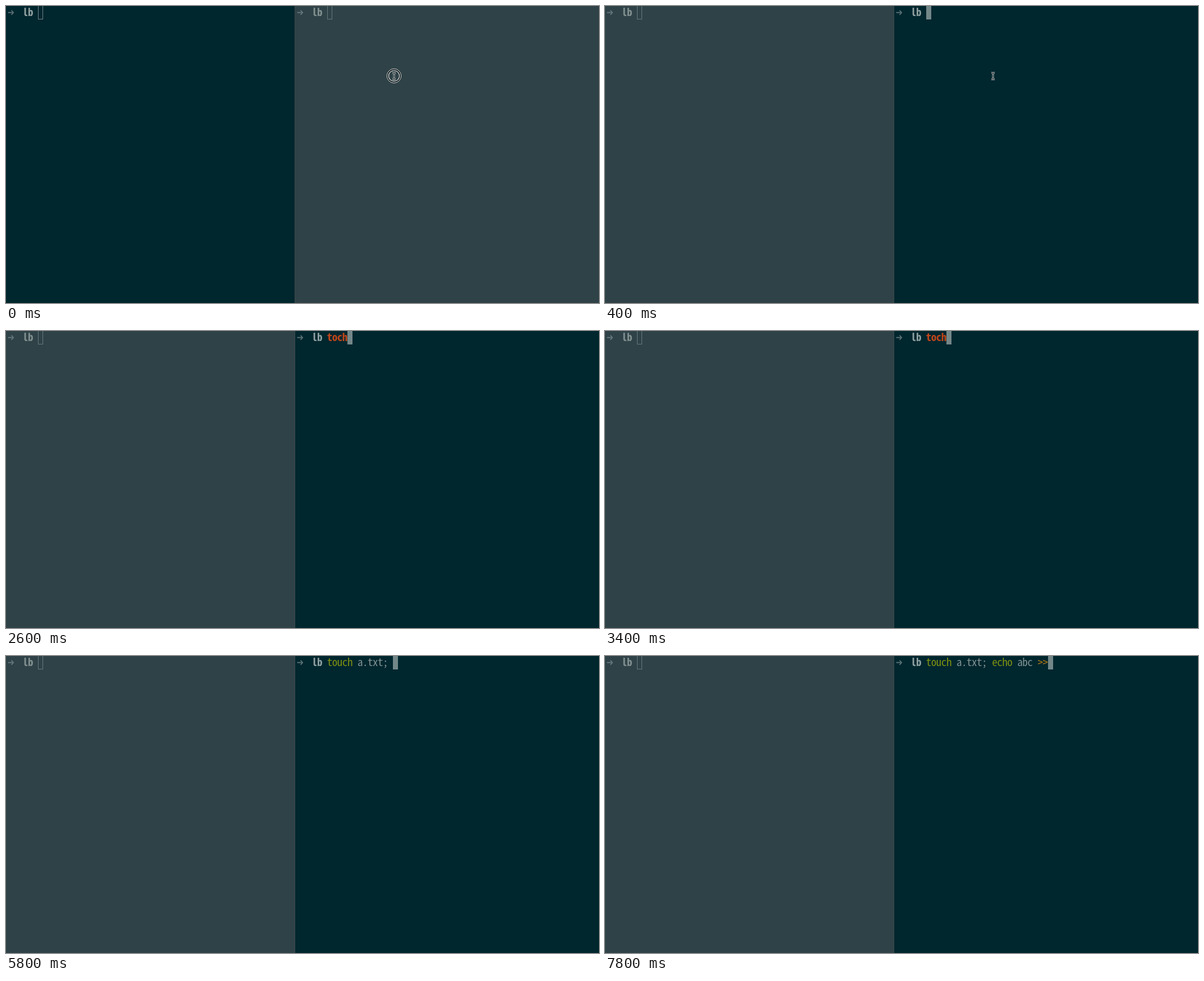
Write an HTML page with a canvas that moves like this. It is 1056 by 530 pixels and loops after 8 s.

```html
<!DOCTYPE html>
<html lang="en">
<head>
<meta charset="utf-8">
<style>
  html, body { margin: 0; width: 100%; height: 100%; overflow: hidden; background: #00262e; }
  canvas { display: block; }
</style>
</head>
<body>
<canvas id="stage" width="1056" height="530"></canvas>
<script>
const ctx = document.getElementById('stage').getContext('2d');
const LOOP = 8000, CELL = 9.03, BASELINE = 18;
const FAMILY = '"Noto Sans Mono CJK JP", "Noto Sans Mono CJK SC", "Noto Sans Mono", monospace';
const DARK = '#00262e', DIM = '#2f4247';
const TEXT = '#819192', CURSOR = '#738788', RED = '#c0461b', GREEN = '#7f9210', GOLD = '#b87d12';

// Command line contents from each moment on
const typing = [
  [0, ''], [600, 't'], [800, 'to'], [1000, 'toch'], [1200, 'toc'], [1400, 'to'], [1600, 't'], [1800, ''],
  [2400, 'to'], [2600, 'toch'], [2800, 'toch '], [3400, 'toch'], [3600, 'toc'], [3800, 'to'],
  [4000, 'tou'], [4200, 'touch'], [4400, 'touch '],
  [4800, 'touch a'], [5000, 'touch a.t'], [5200, 'touch a.txt'], [5800, 'touch a.txt; '],
  [6000, 'touch a.txt; e'], [6200, 'touch a.txt; ec'], [6400, 'touch a.txt; ech'],
  [6600, 'touch a.txt; echo'], [6800, 'touch a.txt; echo '],
  [7000, 'touch a.txt; echo a'], [7200, 'touch a.txt; echo abc'], [7400, 'touch a.txt; echo abc '],
  [7800, 'touch a.txt; echo abc >>']
];

function write(text, x, color, bold) {
  ctx.font = `${bold ? 'bold' : 'normal'} 19px ${FAMILY}`;
  ctx.fillStyle = color;
  ctx.textAlign = 'center';
  [...text].forEach((ch, i) => ctx.fillText(ch, x + (i + 0.5) * CELL, BASELINE));
}

function arrow(x, color) {
  ctx.fillStyle = color;
  ctx.fillRect(x, 10.7, 7, 2);
  ctx.beginPath();
  ctx.moveTo(x + 5.3, 7.5);
  ctx.lineTo(x + 7, 7.5);
  ctx.lineTo(x + 10.8, 11.7);
  ctx.lineTo(x + 7, 15.9);
  ctx.lineTo(x + 5.3, 15.9);
  ctx.lineTo(x + 7.5, 11.7);
  ctx.fill();
}

function cursor(x, filled, color) {
  if (filled) {
    ctx.fillStyle = CURSOR;
    ctx.fillRect(x, 0, 9, 24);
  } else {
    ctx.strokeStyle = color;
    ctx.lineWidth = 1;
    ctx.strokeRect(x + 0.5, -0.5, 8, 24);
  }
}

function command(line, x) {
  let commandNext = true, column = 0;
  for (const part of line.match(/\s+|;|>+|[^\s;>]+/g) || []) {
    let color = TEXT, bold = false;
    if (part === ';') commandNext = true;
    else if (part[0] === '>') color = GOLD;
    else if (part.trim() && commandNext) {
      bold = !['touch', 'echo'].includes(part);
      color = bold ? RED : GREEN;
      commandNext = false;
    }
    write(part, x + column * CELL, color, bold);
    column += part.length;
  }
}

function pane(x, width, active, filled, line) {
  ctx.fillStyle = active ? DARK : DIM;
  ctx.fillRect(x, 0, width, 530);
  const left = x ? 518 : 3;
  arrow(left + 0.6, active ? '#597075' : '#63767a');
  write('lb', left + 3 * CELL, active ? '#90a0a0' : '#829090', true);
  command(line, left + 54);
  cursor(Math.round(left + 54 + line.length * CELL), filled, active ? '#71878a' : '#667a7e');
}

function ring(radius, width, color) {
  ctx.strokeStyle = color;
  ctx.lineWidth = width;
  ctx.beginPath();
  ctx.arc(691, 124.7, radius, 0, 2 * Math.PI);
  ctx.stroke();
}

function pointer() {
  const stem = new Path2D('M688 118.8 Q691 118.8 691 121 Q691 118.8 694 118.8 M691 121 V129 M688 131.2 Q691 131.2 691 129 Q691 131.2 694 131.2 M689.5 125 H692.5');
  for (const [width, color] of [[2.8, '#d5dcdd'], [1.1, '#1b2528']]) {
    ctx.strokeStyle = color;
    ctx.lineWidth = width;
    ctx.stroke(stem);
  }
}

function draw(t) {
  const line = typing.findLast(([start]) => start <= t)[1];
  const rightActive = t >= 400;
  pane(0, 514, !rightActive, t >= 200 && !rightActive, '');
  pane(515, 541, rightActive, rightActive, line);
  ctx.fillStyle = '#3b494c';
  ctx.fillRect(514, 0, 1, 530);
  if (t < 200) {
    ring(11.3, 3.8, '#10191c');
    ring(12.7, 1, '#e4e8e8');
    ring(9.7, 1.2, '#e4e8e8');
  }
  if (t < 600) pointer();
}

function tick() {
  draw(performance.now() % LOOP);
  requestAnimationFrame(tick);
}
tick();
</script>
</body>
</html>
```
